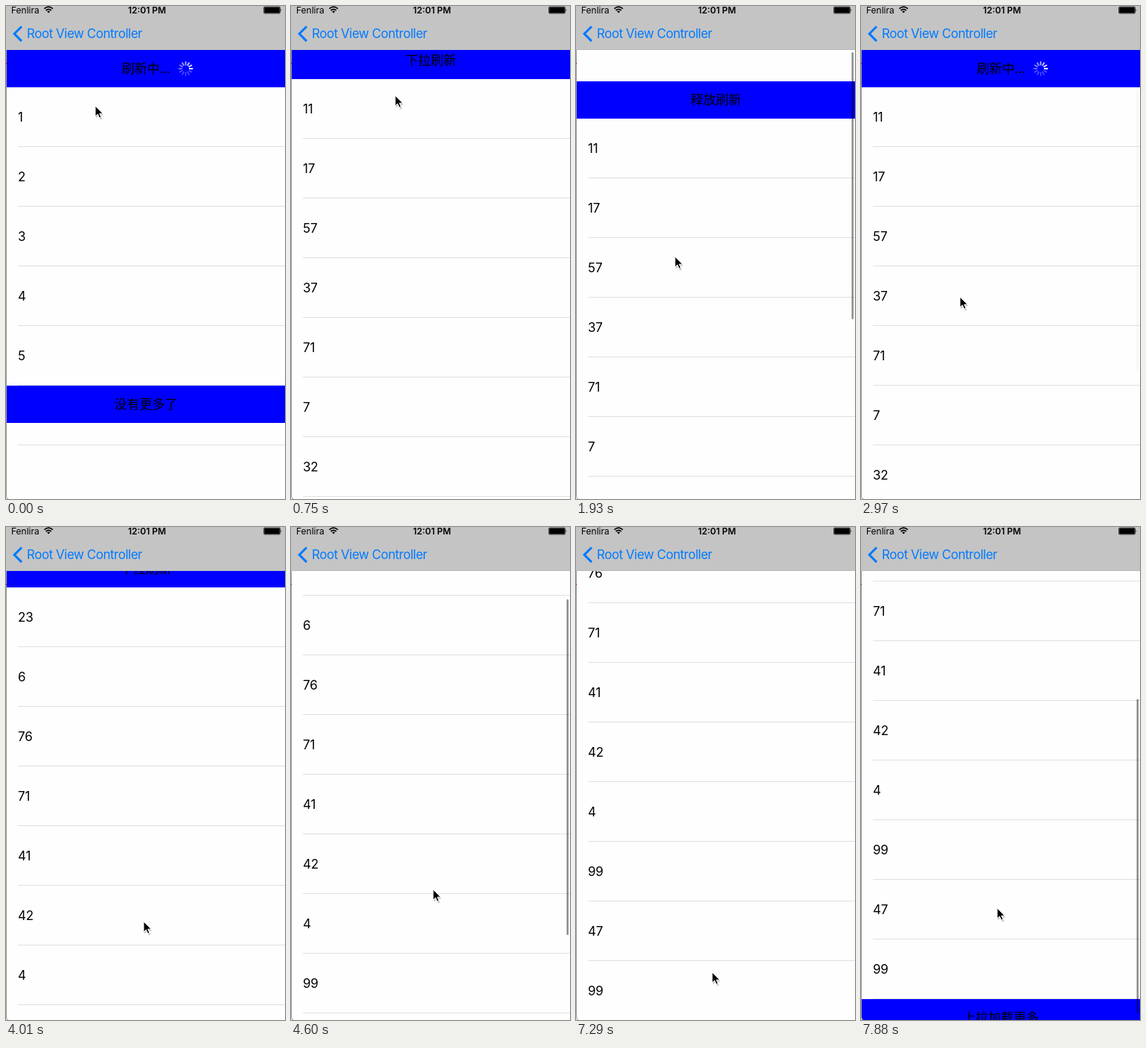
Animation of 375 by 661 pixels, one loop 8 s. Source, as an HTML page:

```html
<!DOCTYPE html>
<html lang="zh">
<head>
<meta charset="utf-8">
<title>Pull to refresh</title>
<style>
  html, body { margin: 0; width: 100%; height: 100%; overflow: hidden; background: #fff; }
  svg { display: block; width: 100vw; height: 100vh; }
  text { font: 17px Inter, Roboto, sans-serif; letter-spacing: -.2px; }
  .label { font: 17px "Noto Sans CJK SC", "Noto Sans CJK", sans-serif; letter-spacing: 0; text-anchor: middle; }
  .status { font-size: 12px; letter-spacing: 0; }
  .clock { font-weight: 600; text-anchor: middle; }
  .title { fill: #007aff; letter-spacing: -.48px; }
</style>
</head>
<body>
<svg viewBox="0 0 375 661" xmlns="http://www.w3.org/2000/svg">
  <rect width="375" height="661" fill="#fefefe"/>
  <g id="header">
    <rect x="1" width="374" height="50" fill="#00f"/>
    <text class="label" x="188" y="31"></text>
    <g id="spinner" transform="translate(241.5 25)" stroke="#fff" stroke-width="1.8" stroke-linecap="round"></g>
  </g>
  <g id="footer">
    <rect x="1" width="374" height="50" fill="#00f"/>
    <text class="label" x="188" y="31"></text>
  </g>
  <rect id="sliver" x="2" y="660" width="14" height="1" fill="#00f"/>
  <g id="rows"></g>
  <rect id="bar" x="370.5" width="2.5" rx="1.25"/>
  <g id="nav">
    <rect width="375" height="59" fill="#c4c4c4"/>
    <rect y="58.5" width="375" height=".5" fill="#b0b0b0"/>
    <text class="status" x="7" y="9.5">Fenlira</text>
    <g fill="none" stroke="#000" stroke-width="1.7">
      <path d="M51.5 3.7Q57.2 -1.3 62.9 3.7M53.6 6Q57.2 2.8 60.8 6"/>
      <path d="M55.2 7.2Q57.2 5.6 59.2 7.2L57.2 9.4Z" fill="#000" stroke="none"/>
    </g>
    <text class="status clock" x="189.5" y="9.5">12:01 PM</text>
    <rect x="346.5" y="1" width="22" height="9" rx="1.5" fill-opacity=".5" stroke="#000" stroke-width=".6"/>
    <rect x="347.5" y="2" width="20" height="7" rx=".6"/>
    <path d="M369.5 4Q371.2 5.5 369.5 7Z"/>
    <path d="M21 27.5L11.2 37.3L21 47.1" fill="none" stroke="#007aff" stroke-width="3"/>
    <text class="title" x="28" y="43">Root View Controller</text>
  </g>
  <path d="M.5 59V657Q.5 660.5 3 660.8" fill="none" stroke="#9a9a9a"/>
  <rect y="76" width="1" height="2" fill="#a33"/>
  <g id="cursor">
    <path d="M.5 1.5V15.5L4 12.2L6.3 17.6L8.8 16.5L6.5 11.4H11Z" fill="#000" opacity=".22" transform="translate(.5 1)"/>
    <path d="M0 0V14L3.3 11L5.6 16.2L8 15.2L5.7 10.2H10.2Z" stroke="#fff" stroke-width="1"/>
  </g>
</svg>
<script>
const LOOP = 8000, TICK = 148.6;
const TOP = 59, VIEW = 603, ROW = 80, PULL = 50;
const NS = 'http://www.w3.org/2000/svg';
const $ = id => document.getElementById(id);

function add(parent, tag, attrs) {
  const node = document.createElementNS(NS, tag);
  set(node, attrs);
  return parent.appendChild(node);
}
function set(node, attrs) {
  for (const key in attrs) node.setAttribute(key, attrs[key]);
}

const linear = u => u;
const smooth = u => u * u * (3 - 2 * u);
const out = u => 1 - (1 - u) ** 2;

// Each key is [time, value, easing used on the way to it].
function track(t, keys) {
  let i = keys.findIndex(k => k[0] > t);
  if (i < 0) return keys[keys.length - 1][1];
  if (i === 0) return keys[0][1];
  const [t0, a] = keys[i - 1], [t1, b, ease = linear] = keys[i];
  return a + (b - a) * ease((t - t0) / (t1 - t0));
}

const RELOADS = [650, 3850];
const DATA = [
  [1, 2, 3, 4, 5],
  [11, 17, 57, 37, 71, 7, 32, 3, 64, 28],
  [23, 6, 76, 71, 41, 42, 4, 99, 47, 99]
];
const RELEASE = 2350;
const SCROLL = [
  [0, -50], [650, -50], [950, 0, smooth],
  [1540, 0], [1932, -92, out], [2250, -112, out], [RELEASE, -112], [2530, -58, out], [2670, -50, out],
  [3850, -50], [4150, 0, smooth],
  [4400, 0], [4607, 47], [4850, 135], [5130, 210, out], [5500, 197, smooth],
  [7580, 197], [7740, 208], [7870, 226]
];
const BAR_ALPHA = [
  [1540, 0], [1640, 1], [2720, 1], [2990, 0],
  [4400, 0], [4460, 1], [5560, 1], [5900, 0],
  [7580, 0], [7640, 1]
];
const CURSOR_X = [
  [0, 120], [1150, 148, smooth], [1540, 148], [1930, 133], [3050, 133], [4250, 191, smooth],
  [4850, 191], [6090, 190], [6960, 183, smooth]
];
const CURSOR_Y = [
  [0, 134], [1150, 114, smooth], [1540, 114], [1932, 336], [2250, 390, out], [3050, 390],
  [4250, 545, smooth], [4400, 545], [4607, 486], [4850, 400], [5300, 400], [6090, 562, smooth],
  [6390, 533, smooth], [6960, 597, smooth], [7580, 597], [7870, 511]
];

const headerText = $('header').querySelector('text');
const footerText = $('footer').querySelector('text');
const petals = Array.from({ length: 12 }, (_, i) =>
  add($('spinner'), 'path', { d: 'M0 -5.2V-9', transform: `rotate(${i * 30})` }));
const rows = Array.from({ length: 12 }, () => {
  const group = add($('rows'), 'g', {});
  return {
    group,
    fill: add(group, 'rect', { x: 1, width: 374, height: ROW, fill: '#d9d9d9' }),
    text: add(group, 'text', { x: 16, y: 46 }),
    line: add(group, 'rect', { x: 16, y: ROW - 1, width: 359, height: 1, fill: '#e0e0e2' })
  };
});

const moveY = (node, y) => set(node, { transform: `translate(0 ${y})` });
const show = (node, on) => set(node, { visibility: on ? 'visible' : 'hidden' });

function draw(t) {
  const offset = Math.round(track(t, SCROLL));
  const page = RELOADS.filter(r => t >= r).length;
  const items = DATA[page];
  const height = items.length * ROW;
  const start = TOP - offset;
  const refreshing = page === 0 || (page === 1 && t >= RELEASE);

  moveY($('header'), start - PULL);
  headerText.textContent = refreshing ? '刷新中...' : offset < -PULL ? '释放刷新' : '下拉刷新';
  show($('spinner'), refreshing);
  const head = 3 + Math.floor((t - (page ? 2970 : 0)) * 12 / 1000);
  petals.forEach((petal, i) => {
    const age = (((head - i) % 12) + 12) % 12;
    set(petal, { 'stroke-opacity': Math.max(.28, 1 - age * .1) });
  });

  moveY($('footer'), start + height);
  footerText.textContent = page ? '上拉加载更多' : '没有更多了';
  show($('sliver'), t > 6080 && t < 6900);

  rows.forEach((row, i) => {
    moveY(row.group, start + i * ROW);
    row.text.textContent = items[i] ?? '';
    show(row.fill, i === 0 && t > 1450 && t < 1580);
    show(row.line, i < items.length || start + (i + 1) * ROW > start + height + PULL);
  });

  const inset = refreshing && t > RELEASE ? PULL : 0;
  const travel = VIEW - 6 - inset;
  const over = Math.max(0, -offset - inset, offset - (height - VIEW));
  const length = Math.max(8, travel * (VIEW - inset) / height - over);
  const from = Math.max(0, offset) / height * travel;
  set($('bar'), {
    y: TOP + 3 + inset + Math.min(from, travel - length),
    height: length,
    opacity: .45 * track(t, BAR_ALPHA)
  });

  set($('cursor'), {
    transform: `translate(${Math.round(track(t, CURSOR_X))} ${Math.round(track(t, CURSOR_Y))})`
  });
}

function frame() {
  const t = performance.now() % LOOP;
  draw(Math.floor((t + 8) / TICK) * TICK);
  requestAnimationFrame(frame);
}
frame();
</script>
</body>
</html>
```
